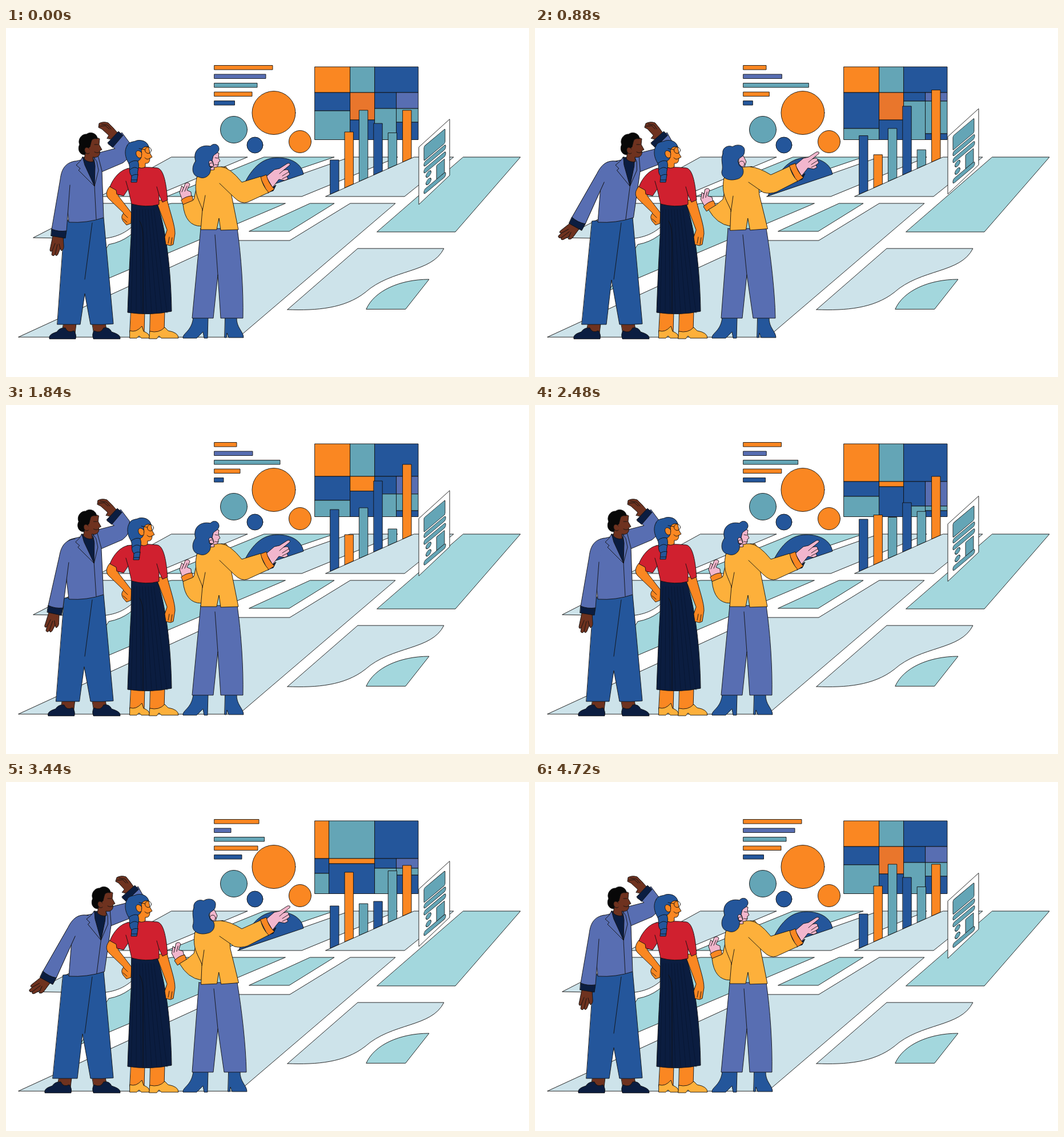
Write an HTML page that moves like this. It is 916 px wide and 611 px high and loops after 4800 ms.

```html
<!DOCTYPE html>
<html lang="en">
<head>
<meta charset="utf-8">
<title>Data landscape</title>
<style>
html, body { margin: 0; width: 100%; height: 100%; overflow: hidden; background: #fff }
svg { display: block; width: 916px; height: 611px }
path, rect, circle { stroke: #111; stroke-width: .9; stroke-linejoin: round; stroke-linecap: round }
.o { fill: #fa8722 } .d { fill: #e9762c } .p { fill: #586eb2 } .t { fill: #64a5b6 }
.n { fill: #24569b } .l { fill: #cde3ea } .a { fill: #a3d7dd } .k { fill: #0b1d40 }
.r { fill: #d0202f } .y { fill: #fdb03b } .b { fill: #6e321f } .i { fill: #f2b6cd }
.h { fill: #080808 } .w { fill: #fff } .x { fill: none } #doc .t { stroke-width: .8 }
</style>
</head>
<body>
<svg viewBox="0 0 916 611">
<g id="floor">
  <path class="l" d="M290 226H423L258 295H165Z"/>
  <path class="a" d="M452 226H575L371 295H282Z"/>
  <path class="l" d="M603 226H686L518 295H406Z"/>
  <path class="l" d="M560 295H698L784 226H715Z"/>
  <path class="a" d="M801 226H901L787 357H650Z"/>
  <path class="l" d="M48 367L165 307H262C235 318 230 366 165 369Z"/>
  <path class="a" d="M489 307H290C240 315 240 368 180 379L130 459Z"/>
  <path class="a" d="M533 307H575L496 356H426Z"/>
  <path class="l" d="M22 541L390 372H497L603 307H682L408 541Z"/>
  <path class="l" d="M493 493L616 386H767C745 430 676 421 629 463C593 491 545 495 493 493Z"/>
  <path class="a" d="M631 492C645 460 690 440 741 440L700 492Z"/>
  <path class="n" d="M408 294L521 256C518 238 500 227 475 227C444 227 424 252 408 294Z"/>
</g>
<circle class="o" cx="469" cy="148.500" r="38"/>
<circle class="t" cx="399" cy="178" r="23.500"/>
<circle class="n" cx="436" cy="205" r="14"/>
<circle class="o" cx="515" cy="199" r="19.500"/>
<g id="charts"></g>
<g id="doc">
  <path class="w" d="M777 0V98L723 149V49Z"/>
  <g transform="matrix(1 -.84 0 1 723 49)">
    <rect class="t" x="9" y="6" width="37" height="25" rx="2"/>
    <rect class="t" x="9" y="34" width="38" height="8" rx="3"/>
    <rect class="t" x="9" y="46" width="38" height="8" rx="3"/>
    <rect class="t" x="31" y="58" width="14" height="24" rx="1"/>
    <circle class="t" cx="17" cy="61" r="4.500"/>
    <circle class="t" cx="17" cy="74" r="4.500"/>
    <rect class="t" x="9" y="82" width="38" height="8" rx="3"/>
  </g>
</g>

<g id="man">
  <g id="manFoot">
    <path class="b" d="M101 517H123L121 534H98Z"/>
    <path class="k" d="M76 544C74 537 83 534 89 532Q94 524 104 525Q108 535 119 530Q124 537 122 544Z"/>
  </g>
  <path class="b" d="M151 517H174L177 534H154Z"/>
  <path class="k" d="M153 544Q150 537 154 530Q166 536 171 525Q181 523 185 532C194 535 201 538 200 544Z"/>
  <path class="n" id="manLegs"/>
  <path class="x" d="M151 341L138 440"/>
  <g id="manTop">
    <path class="b" d="M177 193L180 188L168 177L162 174L163 167Q170 163 179 166L188 175L195 183L186 195Z"/>
    <path class="x" d="M164 172L174 171L181 177M167 168L178 170L184 177"/>
    <path class="p" d="M160 219L191 211L179 203L203 183L218 203Q222 224 205 236L165 253"/>
    <path class="k" d="M178 201L197 181L205 188L187 209Z"/>
    <path class="p" d="M131 231C120 234 112 234 108 240L104 280L110 340Q142 342 171 332L168 250L160 219L152 226Z"/>
    <path class="k" d="M134 226L152 228L157 242L155 277L133 238Z"/>
    <path class="p" d="M134 226L130 233L123 240L130 246L127 249L155 277L138 240Z"/>
    <path class="p" d="M154 226L159 234L162 249L155 277L156 242Z"/>
    <path class="x" d="M155 277L158 335"/>
  </g>
  <g id="manHead">
    <path class="b" d="M142 204C146 193 158 190 164 194L163 204L168 213L164 215C166 223 160 228 152 226L153 234Q143 236 137 229L139 218Z"/>
    <path class="h" d="M138 222C128 222 125 211 129 204C125 195 133 185 141 186C148 180 160 185 160 194Q150 192 149 200L147 208L141 213Z"/>
    <path class="b" d="M146 212C141 205 135 211 139 218Q143 222 146 219"/>
    <path class="x" d="M155 204H161M155 217Q160 220 164 217"/>
  </g>
  <g id="manArm">
    <g id="manHand">
      <path class="b" d="M82 364L77 388Q77 393 81 390L80 397Q83 401 86 396Q88 401 91 396L95 386L97 390Q102 388 101 380L100 364Z"/>
      <path class="x" d="M81 390L86 377M86 396L90 379M95 386L93 378"/>
    </g>
    <path class="k" d="M80 352L106 355L104 368L79 364Z"/>
    <path class="p" d="M121 233C103 236 97 248 95 265L80 352Q92 357 106 355L112 275"/>
  </g>
</g>

<g id="braided">
  <path class="o" d="M219 495H243L242 533H217ZM253 495H278L277 533H252Z"/>
  <path class="y" d="M217 530Q228 534 238 522L241 531Q252 535 252 543H237L233 539L229 543H217Z"/>
  <path class="y" d="M252 531Q268 535 278 524L284 530Q302 533 302 543H272L268 539L264 544H251Z"/>
  <path class="o" d="M182 277C174 286 175 294 180 299L206 324Q200 330 205 338L211 345L219 342L220 324L196 293L206 290Z"/>
  <path class="x" d="M206 325L213 332M205 334L212 340"/>
  <path class="k" d="M220 308H265C281 355 289 425 290 496Q252 504 213 498C215 440 217 400 219 366Z"/>
  <path class="x" id="pinstripes" style="stroke:#06132c;stroke-width:.6"/>
  <path class="x" d="M234 338Q240 346 240 370V500"/>
  <path class="o" d="M263 302L282 300C288 325 296 345 296 360L293 379L288 381L280 379L278 366L282 354Z"/>
  <path class="x" d="M284 377L286 366M289 379L291 367"/>
  <path class="r" d="M213 246C200 249 188 262 182 278L193 284L194 291L206 294L214 282L220 308Q245 315 268 309L268 292L274 305L283 301C281 276 277 247 265 245Q240 242 213 246Z"/>
  <path class="x" d="M214 282L210 268M268 292L264 278"/>
  <g id="braidedHead">
    <path class="o" d="M233 206L250 208L252 219L256 226L252 228Q252 238 244 237V243Q237 248 229 242V225Z"/>
    <path class="n" d="M212 206C215 198 224 200 229 197C240 195 248 200 250 208Q240 206 237 214Q240 229 231 233C235 243 229 250 231 257L229 270H219L220 259C214 253 218 244 215 237C208 226 207 214 212 206Z"/>
    <path class="x" d="M215 237Q224 230 231 233M217 248Q225 241 231 246M220 259Q226 255 231 257M220 266H230"/>
    <path class="o" d="M237 218C231 211 225 216 229 224Q233 230 237 226"/>
    <circle class="x" cx="249" cy="214" r="5.500"/>
    <path class="x" d="M243 213L233 211M243 227Q247 232 252 228"/>
  </g>
</g>

<g id="pointer">
  <path class="n" d="M328 506H354L353 543H347L345 532L334 543H310C309 534 326 531 328 506Z"/>
  <path class="n" id="boot" d="M384 506H404C403 525 416 531 416 542H390L387 534L386 542H383Z"/>
  <path class="p" id="slacks"/>
  <g id="raisedHand">
    <path class="i" d="M309 302L304 288L308 276L311 280L314 272Q320 269 322 274L317 284L324 287L325 298Z"/>
    <path class="x" d="M308 287L311 280M313 286L317 277"/>
    <path class="o" d="M307 301Q316 294 326 294L328 303L311 310Z"/>
  </g>
  <path class="y" id="bentArm"/>
  <g id="jacket">
    <path class="y" d="M334 262Q342 246 362 243H385Q394 250 395 293L407 353L376 354L373 333L369 353H341L344 318C338 300 328 290 334 262Z"/>
    <path class="x" d="M344 320L349 293"/>
  </g>
  <g id="pointingHand">
    <path class="k" d="M455 262L468 278L473 275L468 285L458 288Z"/>
    <path class="i" d="M456 260L470 248L479 246L493 237Q499 236 497 240L486 249Q495 246 495 251L497 256L492 260L494 264L488 267L478 265L467 279Z"/>
    <path class="x" d="M486 249L479 255M495 252L484 259M492 260L484 264"/>
    <path class="o" d="M445 261L456 257Q459 271 470 282L459 289Z"/>
  </g>
  <path class="y" id="sleeve"/>
  <g id="headProfile">
    <path class="i" d="M361 217L373 219L372 227L375 233L372 235Q373 245 364 244L365 248Q358 250 352 246Z"/>
    <path class="n" d="M332 233C326 214 342 203 358 207C364 200 374 204 373 213C371 220 366 220 363 224L361 232C366 239 361 243 358 246C360 257 348 266 338 261C327 260 323 245 332 233Z"/>
    <path class="i" d="M362 235C357 228 353 234 357 242L363 243"/>
    <path class="x" d="M366 227L371 228M366 239Q369 241 372 239"/>
    <circle class="x" cx="360" cy="240" r="4"/>
  </g>
  <g id="headAway">
    <path class="i" d="M358 222L365 224L370 234L367 243L356 247Z"/>
    <path class="n" d="M329 220C327 210 338 204 346 208C354 202 368 205 367 215Q367 223 361 226C353 231 355 235 359 240C369 247 366 263 352 265C341 268 327 264 327 252C331 240 324 232 329 220Z"/>
    <circle class="x" cx="362" cy="238" r="5"/>
  </g>
</g>
</svg>
<script>
const LOOP = 4800, STEP = 80, SWAY = 2400, MOVE = 880;
const el = id => document.getElementById(id);
const set = (id, name, value) => el(id).setAttribute(name, value);
const move = (id, value) => set(id, 'transform', value);
const ease = u => (u = Math.min(1, Math.max(0, u)), u * u * (3 - 2 * u));

// Eased value of [time, value] keys.
function track(t, keys) {
  let value = keys[0][1];
  for (let i = 1; i < keys.length; i++) {
    const [t0, v0] = keys[i - 1], [t1, v1] = keys[i];
    value += (v1 - v0) * ease((t - t0) / (t1 - t0));
  }
  return value;
}

// Cycles through chart states; each change begins at its own start time.
const cycle = (t, states, starts) => states[0].map((first, k) =>
  starts.reduce((sum, start, i) => sum +
    (states[(i + 1) % states.length][k] - states[i][k]) * ease((t - start) / MOVE), first));

const rowStates = [[102, 90, 75, 66, 35.5], [39, 67, 115, 45, 16], [78, 29, 87.5, 76, 48]];
const barStates = [[231, 182, 144, 167, 183.5, 144], [183, 227, 180, 133, 217, 104], [217, 158, 213, 209, 155.5, 146]];
// column, row, left split, middle split, right split, corner split
const mapStates = [[603, 113, 145, 161, 141, 165], [603, 113, 176, 161, 128, 185],
  [603, 134, 160, 143, 177, 185], [566, 134, 160, 143, 151, 163]];

const shape = (color, d) => `<path class="${color}" d="${d}"/>`;
const box = (color, x0, y0, x1, y1) => shape(color, `M${x0} ${y0}H${x1}V${y1}H${x0}Z`);

function charts(t) {
  const rows = cycle(t, rowStates, [66, 1917, 3517]).map((w, i) =>
    box('opton'[i], 365, 65.5 + 15.5 * i, 365 + w, 73 + 15.5 * i));
  const [c, r, l, m, s, q] = cycle(t, mapStates, [0, 1360, 2500, 3460]);
  const cells = [
    ['o', 541, 68, c, r], ['t', c, 68, 646, r], ['n', 646, 68, 722, r],
    ['n', 541, r, c, l], ['t', 541, l, c, 195.5],
    [m > 155 ? 'd' : 'o', c, r, 646, m], ['n', c, m, 646, 195.5],
    ['n', 646, r, 684, s], ['t', 646, s, 684, 195.5],
    ['p', 684, r, 722, s], ['t', 684, s, 722, q], ['n', 684, q, 722, 195.5]
  ].map(cell => box(...cell));
  const bars = cycle(t, barStates, [185, 2040, 3640]).map((top, i) => {
    const x = 568 + 25.4 * i, base = 291 - 11.3 * i;
    return shape('notnto'[i], `M${x} ${top}h15V${base - 6.6}L${x} ${base}Z`);
  });
  el('charts').innerHTML = [...rows, ...cells, ...bars].join('');
}

function people(t) {
  const s = t % SWAY;
  const lean = track(s, [[80, 0], [480, 1], [1120, 1], [1640, -.32], [1880, -.05], [2240, 0]]);
  const arm = track(s, [[80, 0], [480, 1], [1120, 1], [1640, .45], [1900, .1], [2240, 0]]);
  const stance = track(s, [[80, 0], [480, 1], [1680, 1], [1900, .12], [2240, 0]]);
  move('manTop', `matrix(1 0 ${-.18 * lean} 1 ${.18 * 340 * lean} 0)`);
  move('manHead', `translate(${23 * lean})`);
  move('manArm', `translate(${16 * lean} ${-6 * lean}) rotate(${20 * arm} 106 256)`);
  move('manHand', `rotate(${20 * arm} 92 362)`);
  move('manFoot', `translate(${-8 * stance})`);
  set('manLegs', 'd', `M${103 - 3 * stance} 338L171 332L188 518Q168 520 148 519L${138 - 4 * stance} ${465 - 24 * stance}L${130 - 5 * stance} 519H${90 - 8 * stance}Z`);

  const nod = track(t, [[1400, 0], [1800, 1], [2160, 1], [2440, 0]]);
  move('braidedHead', `translate(${4 * nod} ${nod})`);

  const p = track(s, [[240, 0], [640, 1], [1120, 1], [1520, 0]]);
  move('boot', `translate(${6 * p})`);
  set('slacks', 'd', `M${341 - 3 * p} 351H405C${412 + p} 400 ${416 + 4 * p} 460 ${415 + 6 * p} 508H${376 + 6 * p}L371 432L363 508H326L${341 - 3 * p} 351ZM371 432L${366 - 2 * p} 362`);
  move('jacket', `rotate(${-2.5 * p} 374 340)`);
  move('pointingHand', `translate(0 ${-20 * p})`);
  set('sleeve', 'd', `M377 243Q392 244 413 ${270 - 13 * p}L446 ${260 - 18 * p}Q449 ${276 - 19 * p} 460 ${288 - 20 * p}L423 ${305 - 18 * p}Q412 ${309 - 18 * p} 400 ${297 - 9 * p}L374 ${272 - 2 * p}`);
  move('raisedHand', `translate(${-12 * p} ${10 * p}) rotate(${-9 * p} 316 300)`);
  set('bentArm', 'd', `M336 268L329 300L${327 - 10 * p} ${302 + 8 * p}L${310 - 6 * p} ${309 + 9 * p}Q${314 + 4 * p} ${347 - 4 * p} 342 347L346 310`);
  el('headProfile').style.display = p < .5 ? '' : 'none';
  el('headAway').style.display = p < .5 ? 'none' : '';
}

set('pinstripes', 'd', Array.from({ length: 8 }, (_, i) => `M${224 + 5 * i} 318L${219 + 9 * i} 499`).join(''));

function draw(now) {
  const t = Math.floor(now % LOOP / STEP) * STEP;
  charts(t);
  people(t);
  move('doc', `translate(0 ${149 + 11 * Math.cos(2 * Math.PI * t / SWAY)})`);
  requestAnimationFrame(draw);
}
draw(0);
</script>
</body>
</html>
```
